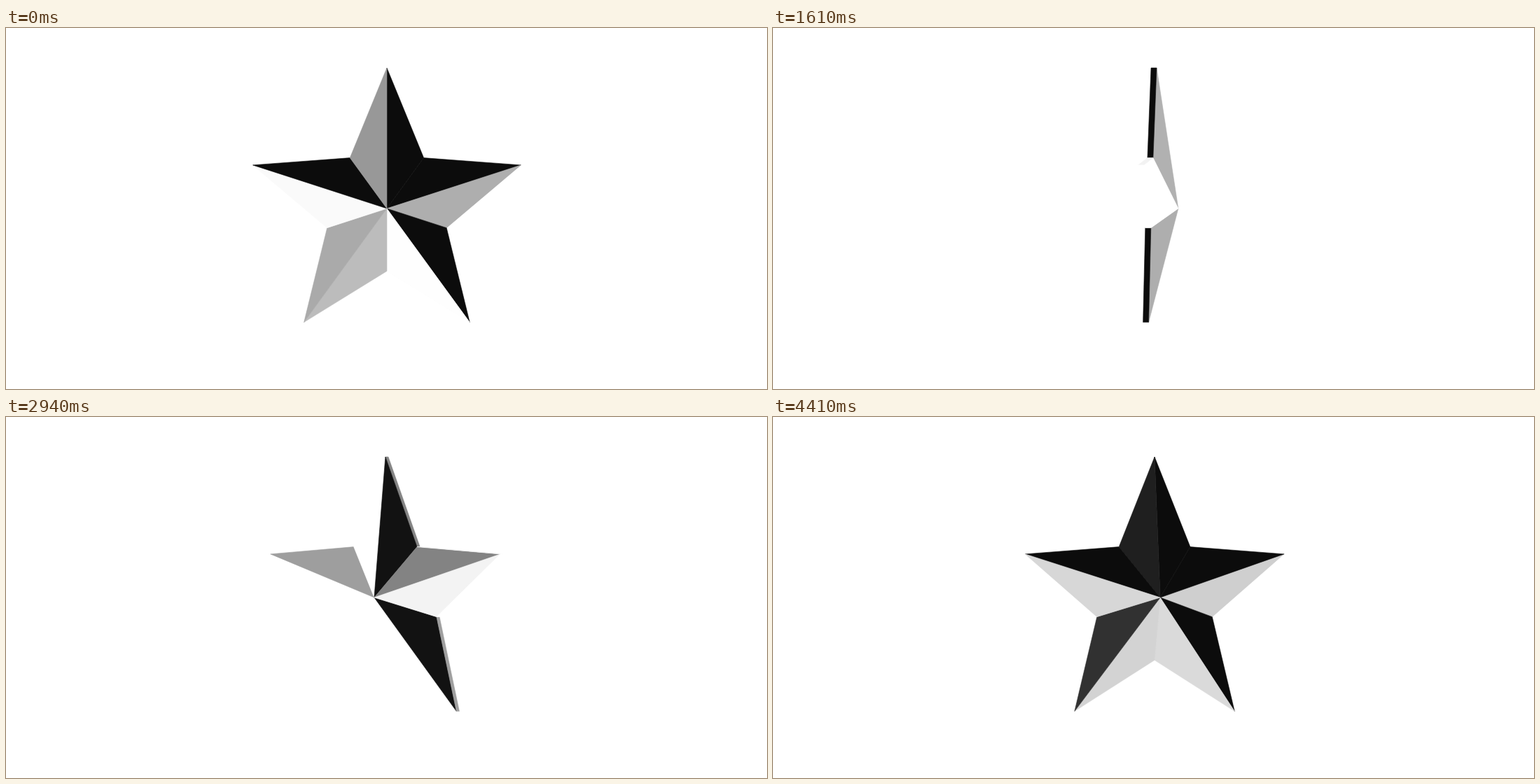
These frames come from a looping animation (1085x516 px, 4.48 s). An HTML page with a canvas:

```html
<!DOCTYPE html>
<html lang="en">
<head>
<meta charset="utf-8">
<title>Spinning star</title>
<style>
  html, body { margin: 0; width: 100%; height: 100%; overflow: hidden; background: #fff; }
  canvas { display: block; }
</style>
</head>
<body>
<canvas id="stage" width="1085" height="516"></canvas>
<script>
const ctx = document.getElementById('stage').getContext('2d');
const LOOP = 4480, STEP = 70;
const CENTER = { x: 543, y: 258 };
const OUTER = 201, INNER = 89.5, APEX = 35, HALF_DEPTH = 4;
const RAD = Math.PI / 180;

// Ten outline points, clockwise from the top tip.
const rim = Array.from({ length: 10 }, (_, i) => {
  const r = i % 2 ? INNER : OUTER, a = i * 36 * RAD;
  return [r * Math.sin(a), -r * Math.cos(a)];
});

// Each outline edge carries a front facet, a back facet and a side wall.
const faces = rim.flatMap((p, i) => {
  const q = rim[(i + 1) % 10];
  const dx = q[0] - p[0], dy = q[1] - p[1], len = Math.hypot(dx, dy);
  const nx = dy / len, ny = -dx / len;
  const front = HALF_DEPTH, back = -HALF_DEPTH;
  return [
    { points: [[0, 0, APEX], [...p, front], [...q, front]], normal: [nx * .43, ny * .43, .9] },
    { points: [[0, 0, -APEX], [...q, back], [...p, back]], normal: [nx * .43, ny * .43, -.9] },
    { points: [[...p, front], [...p, back], [...q, back], [...q, front]], normal: [nx, ny, 0] }
  ];
});

// Spin progress as [step, degrees]; the speed drifts a little.
const spin = [[0, 0], [14, 167.4], [23, 266.6], [36, 426.2], [48, 556.1], [57, 676.5], [63, 751]];

function angleAt(step) {
  const i = Math.max(1, spin.findIndex(([s]) => s >= step));
  const [s0, a0] = spin[i - 1], [s1, a1] = spin[i];
  const turn = a0 + (a1 - a0) * (step - s0) / (s1 - s0);
  // Linger when the star faces the viewer.
  return (turn - 18 * Math.sin(2 * turn * RAD)) * RAD;
}

// Lit from both sides and from below, dark towards the viewer.
function brightness(nx, ny) {
  if (ny > .1) return .66 + 1.2 * (ny - .33) + .6 * Math.abs(nx - .26);
  const r = Math.hypot(nx, ny);
  const left = -2 * nx - .22 + .6 * (ny + .16);
  const right = 2.85 * nx + .44 * r - 2.15;
  return Math.max(left, right, 0) + 20 * Math.max(0, r - .95);
}

function shade(nx, ny) {
  const v = Math.round(12 + 243 * Math.min(1, brightness(nx, ny)));
  return `rgb(${v},${v},${v})`;
}

function facesViewer([a, b, c]) {
  return (b[0] - a[0]) * (c[1] - a[1]) - (b[1] - a[1]) * (c[0] - a[0]) > 0;
}

function draw(step) {
  const angle = angleAt(step), cos = Math.cos(angle), sin = Math.sin(angle);
  const turn = ([x, y, z]) => [x * cos + z * sin, y, z * cos - x * sin];
  const visible = faces
    .map(({ points, normal }) => {
      const turned = points.map(turn), n = turn(normal);
      const depth = turned.reduce((sum, p) => sum + p[2], 0) / turned.length;
      return { points: turned, depth, color: shade(n[0], n[1]) };
    })
    .filter(face => facesViewer(face.points))
    .sort((a, b) => a.depth - b.depth);

  ctx.fillStyle = '#fff';
  ctx.fillRect(0, 0, 1085, 516);
  ctx.lineWidth = .6;
  ctx.lineJoin = 'round';
  for (const { points, color } of visible) {
    ctx.beginPath();
    points.forEach(([x, y]) => ctx.lineTo(CENTER.x + x, CENTER.y + y));
    ctx.closePath();
    ctx.fillStyle = ctx.strokeStyle = color;
    ctx.fill();
    ctx.stroke();
  }
}

const start = performance.now();
function tick() {
  const time = (performance.now() - start) % LOOP;
  draw(Math.floor(time / STEP));
  requestAnimationFrame(tick);
}
tick();
</script>
</body>
</html>
```
